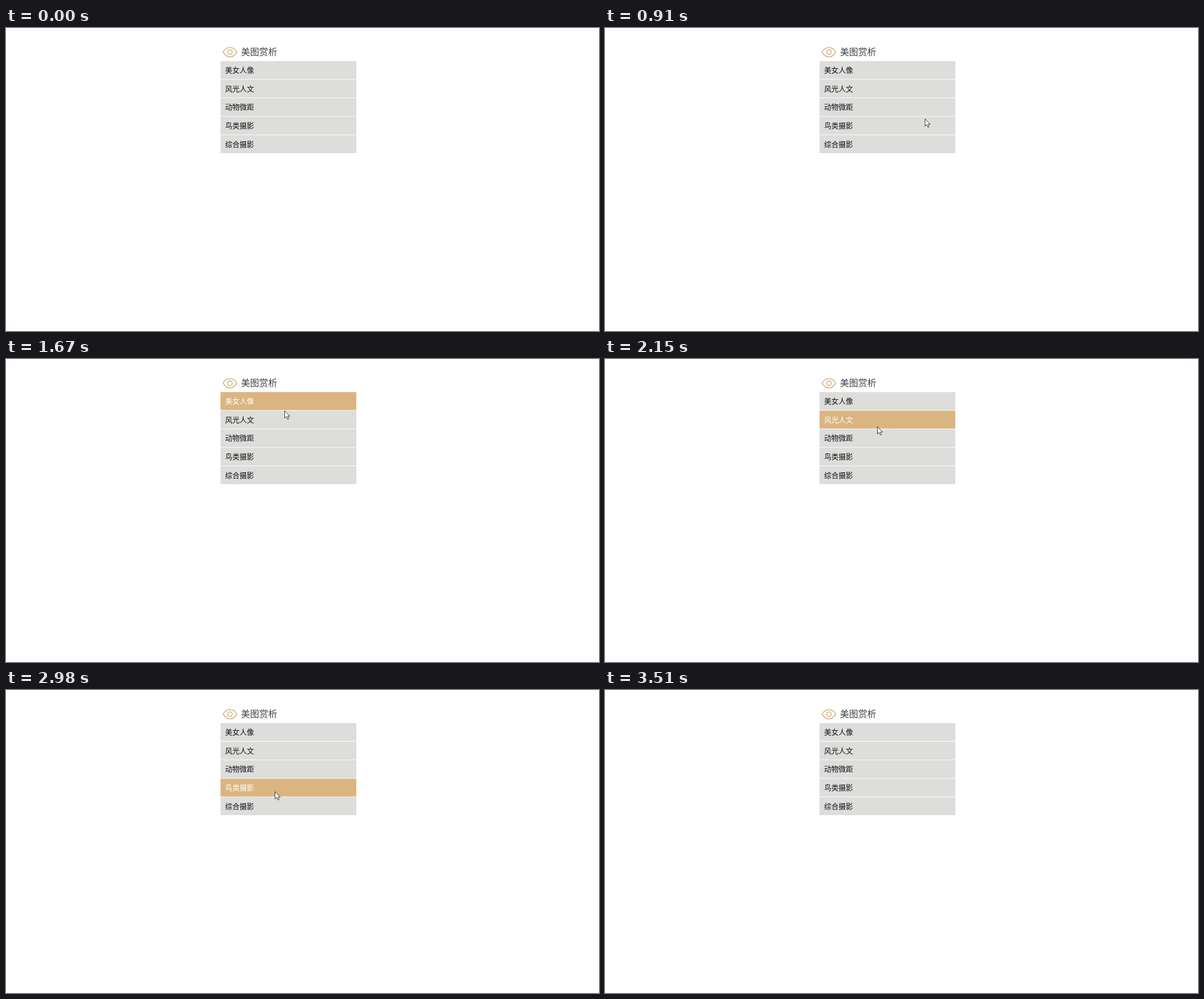
An HTML page that plays this animation: 1046 px wide and 535 px high, repeating every 4.92 s.

```html
<!DOCTYPE html>
<html lang="zh-CN">
<head>
<meta charset="utf-8">
<title>美图赏析</title>
<style>
  html, body { margin: 0; width: 100%; height: 100%; overflow: hidden; background: #fff; }
  svg { display: block; font-family: "Noto Sans CJK SC", "Noto Sans CJK", sans-serif; }
  .title { font-size: 16px; font-weight: 300; fill: #444; }
  .row rect { fill: #dddddc; }
  .row text { font-size: 12.8px; fill: #111; }
  .row.on rect { fill: #dbb581; }
  .row.on text { fill: #fff; }
  .eye { fill: none; stroke: #d6b785; stroke-width: 1.7; }
</style>
</head>
<body>
<svg width="1046" height="535" viewBox="0 0 1046 535">
  <g class="eye">
    <path d="M383 42.5C386 37.2 390 34.5 395 34.5S404 37.2 407 42.5C404 48 400 51 395 51S386 48 383 42.5Z"/>
    <circle cx="395" cy="42.7" r="4"/>
  </g>
  <text class="title" x="414.4" y="48">美图赏析</text>
  <g id="menu"></g>
  <path id="cursor" d="M.5 .5V13.3L3.5 10.6L5.7 15.3L7.7 14.4L5.7 9.9H9.7Z"
        fill="#fff" stroke="#222" stroke-width=".9" visibility="hidden"/>
</svg>
<script>
const LOOP = 4920, EXIT = 3510;
const STEP = 75;        // pointer redraw interval
const LAG = 110;        // highlight trails the pointer
const LEFT = 378.4, TOP = 58.4, WIDTH = 239.5, HEIGHT = 31.8, PITCH = 32.7;
const labels = ["美女人像", "风光人文", "动物微距", "鸟类摄影", "综合摄影"];

// pointer path: time, x, y
const path = [
  [430, 973, 494], [910, 564, 160], [970, 508, 88], [1220, 495, 66],
  [1670, 491, 91], [1980, 482, 115], [2150, 480, 119], [2600, 475, 145],
  [2830, 474, 170], [2980, 474, 179], [3060, 475, 196], [3140, 476, 205],
  [3350, 560, 280], [3430, 667, 382]
];

// spans in which the picture updates; it holds still in between
const bursts = [
  [430, 910], [970, 970], [1150, 1220], [1520, 1980],
  [2150, 2360], [2600, 2830], [2980, 3140], [3350, 3430]
];

const menu = document.getElementById("menu");
const cursor = document.getElementById("cursor");

function add(parent, tag, attrs) {
  const el = document.createElementNS("http://www.w3.org/2000/svg", tag);
  for (const key in attrs) el.setAttribute(key, attrs[key]);
  return parent.appendChild(el);
}

const rows = labels.map((label, i) => {
  const y = TOP + i * PITCH;
  const row = add(menu, "g", { class: "row" });
  add(row, "rect", { x: LEFT, y, width: WIDTH, height: HEIGHT });
  add(row, "text", { x: LEFT + 8, y: y + 20.5 }).textContent = label;
  return row;
});

function pointAt(t) {
  const i = path.findIndex(p => p[0] >= t);
  if (i < 0) return path[path.length - 1].slice(1);
  if (i === 0) return path[0].slice(1);
  const [t0, x0, y0] = path[i - 1], [t1, x1, y1] = path[i];
  const k = (t - t0) / (t1 - t0);
  return [x0 + (x1 - x0) * k, y0 + (y1 - y0) * k];
}

function rowAt([x, y]) {
  return x >= LEFT && x <= LEFT + WIDTH ? Math.floor((y - TOP) / PITCH) : -1;
}

function heldTime(t) {
  const [from, to] = bursts.findLast(b => b[0] <= t);
  return t >= to ? to : from + Math.floor((t - from) / STEP) * STEP;
}

function draw(t) {
  const shown = t >= path[0][0] && t < EXIT;
  let lit = -1;
  if (shown) {
    const now = heldTime(t);
    const [x, y] = pointAt(now).map(Math.round);
    cursor.setAttribute("transform", `translate(${x} ${y})`);
    lit = rowAt(pointAt(now - LAG));
  }
  cursor.setAttribute("visibility", shown ? "visible" : "hidden");
  rows.forEach((row, i) => row.classList.toggle("on", i === lit));
}

const start = performance.now();
function tick() {
  draw((performance.now() - start) % LOOP);
  requestAnimationFrame(tick);
}
tick();
</script>
</body>
</html>
```
